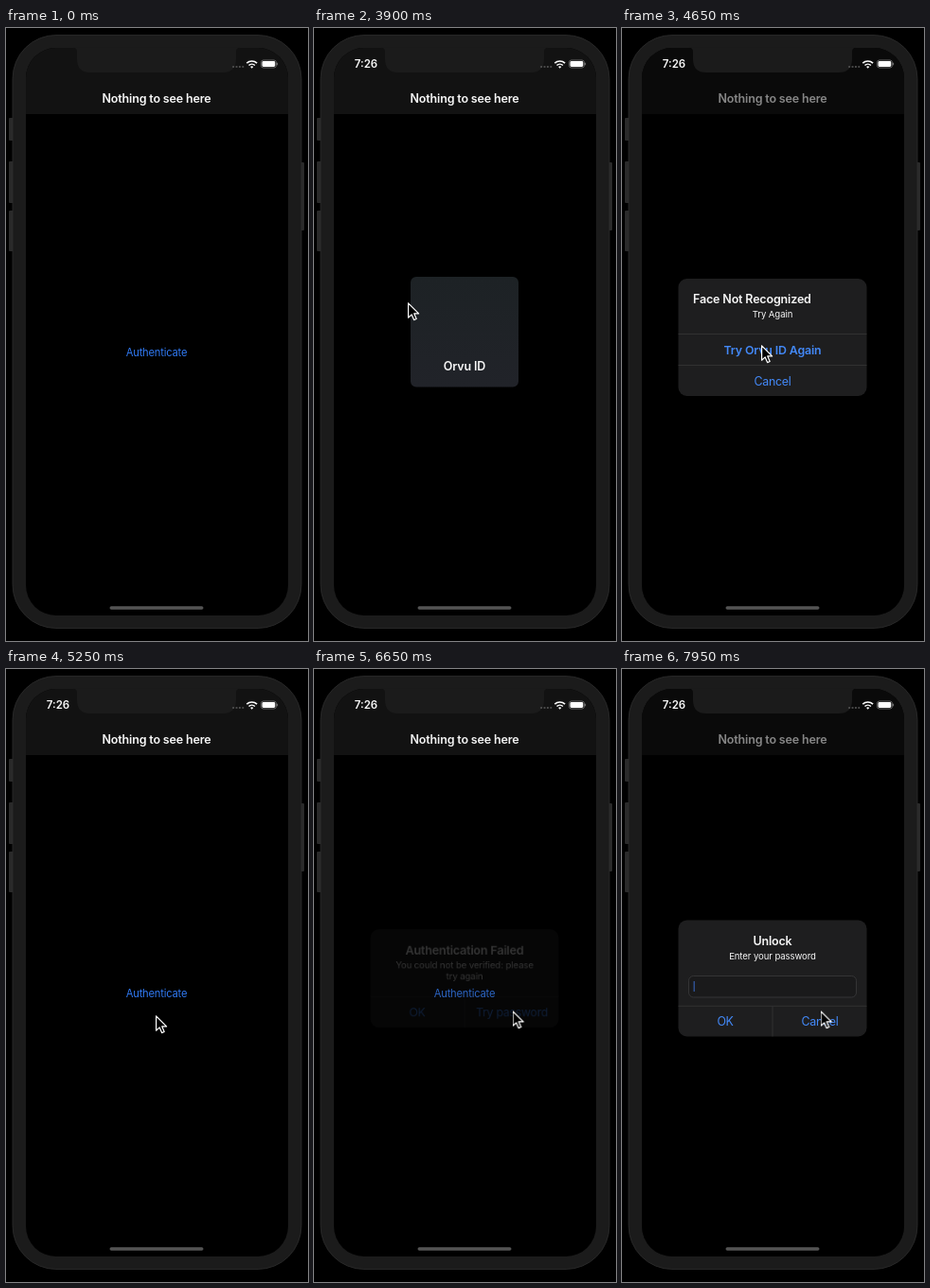
Write an HTML page that moves like this. It is 319 by 648 pixels and loops after 8000 ms.

```html
<!DOCTYPE html>
<html lang="en">
<head>
<meta charset="utf-8">
<title>Unlock flow</title>
<style>
  html, body { margin: 0; width: 100%; height: 100%; overflow: hidden; background: #000; }
  svg { display: block; width: 100%; height: 100%; }
  text { font-family: Inter, Roboto, sans-serif; text-anchor: middle; fill: #f7f7f7; }
  .head { font-size: 12.5px; font-weight: 600; letter-spacing: -.013em; }
  .note { font-size: 9.6px; letter-spacing: -.01em; }
  .action { font-size: 12.4px; letter-spacing: -.025em; fill: #4389f8; }
  .strong { font-weight: 600; letter-spacing: -.013em; }
  .link { font-size: 11.2px; letter-spacing: -.018em; fill: #3079f2; }
  .clock { font-size: 11.5px; font-weight: 600; }
  .card { fill: #1e1e1f; }
  .rule { stroke: #363637; stroke-width: .8; fill: none; }
  .press { fill: #fff; fill-opacity: .1; }
  .alert { transform-origin: 159px 327px; }
</style>
</head>
<body>
<svg viewBox="0 0 319 648">
  <defs>
    <clipPath id="screen"><rect x="21" y="21" width="277" height="600" rx="32"/></clipPath>
    <linearGradient id="glass" x2="0" y2="1">
      <stop stop-color="#1d2225"/><stop offset="1" stop-color="#212329"/>
    </linearGradient>
  </defs>
  <rect width="319" height="648"/>

  <!-- phone body -->
  <g fill="#2a2a2a">
    <rect x="3" y="95" width="5" height="24" rx="1"/>
    <rect x="3" y="141" width="5" height="44" rx="1"/>
    <rect x="3" y="193" width="5" height="43" rx="1"/>
    <rect x="311" y="142" width="4" height="72" rx="1"/>
  </g>
  <rect x="7" y="7.5" width="305" height="627" rx="46" fill="#1b1b1b" stroke="#2e2e2e" stroke-width=".8"/>

  <g clip-path="url(#screen)">
    <rect x="21" y="21" width="277" height="600"/>
    <rect x="21" y="21" width="277" height="70" fill="#121212"/>
    <text class="head" x="159" y="78.6">Nothing to see here</text>
    <text id="login" class="link" x="159" y="347">Authenticate</text>
    <rect id="dim" x="21" y="21" width="277" height="600"/>

    <g id="scan">
      <rect x="102" y="263" width="114" height="116.5" rx="6" fill="url(#glass)"/>
      <text class="head" x="159" y="361.6">Orvu ID</text>
    </g>

    <g id="retry" class="alert">
      <rect class="card" x="59.5" y="265" width="199" height="124" rx="9"/>
      <rect id="pressCancel" class="press" x="59.5" y="357" width="199" height="32" rx="6"/>
      <path class="rule" d="M59.5 323.5h199M59.5 356.5h199"/>
      <text class="head" x="75" y="291.4" style="text-anchor:start">Face Not Recognized</text>
      <text class="note" x="159" y="306">Try Again</text>
      <text class="action strong" x="159" y="345">Try Orvu ID Again</text>
      <text class="action" x="159" y="377.6">Cancel</text>
    </g>

    <g id="failed" class="alert">
      <rect class="card" x="59.5" y="275" width="199" height="104" rx="9"/>
      <rect id="pressPassword" class="press" x="159" y="346.5" width="99.5" height="32.5" rx="6"/>
      <path class="rule" d="M59.5 346.2h199M159 346.2V379"/>
      <text class="head" x="159" y="302">Authentication Failed</text>
      <text class="note" x="159" y="316.7">You could not be verified: please</text>
      <text class="note" x="159" y="328.5">try again</text>
      <text class="action" x="109" y="367.2">OK</text>
      <text class="action" x="209" y="367.2">Try password</text>
    </g>

    <g id="unlock" class="alert">
      <rect class="card" x="59.5" y="265.5" width="199" height="123" rx="9"/>
      <rect x="70.5" y="324.5" width="177" height="22.5" rx="5" fill="#1a1a1b" stroke="#3c3c3d" stroke-width=".8"/>
      <rect id="caret" x="75.5" y="330" width="1.5" height="11" fill="#3f7df0"/>
      <path class="rule" d="M59.5 356.3h199M159 356.3V388.5"/>
      <text class="head" x="159" y="292">Unlock</text>
      <text class="note" x="159" y="306.7">Enter your password</text>
      <text class="action" x="109" y="377.4">OK</text>
      <text class="action" x="209" y="377.4">Cancel</text>
    </g>
  </g>

  <!-- notch, status bar, home bar -->
  <path fill="#1b1b1b" d="M71 20.5q4 .5 4 4.5v8q0 14 14 14h140q14 0 14-14v-8q0-4 4-4.5z"/>
  <text id="clockBefore" class="clock" x="55" y="42">7:25</text>
  <text id="clockAfter" class="clock" x="55" y="42">7:26</text>
  <path d="M239.2 41h12" stroke="#5c5c5c" stroke-width="1.7" stroke-dasharray="1.9 1.5"/>
  <g fill="none" stroke="#fff" stroke-width="1.6">
    <path d="M254.3 37.2a7.8 7.8 0 0 1 10.8 0"/>
    <path d="M256.5 39.5a4.6 4.6 0 0 1 6.4 0"/>
  </g>
  <path fill="#fff" d="M258.1 41l1.6 1.7 1.6-1.7a2.3 2.3 0 0 0-3.2 0z"/>
  <rect x="269.4" y="34" width="16" height="8" rx="2.4" fill="none" stroke="#777" stroke-width=".8"/>
  <rect x="270.5" y="35.1" width="13.8" height="5.8" rx="1.4" fill="#fff"/>
  <path d="M286.6 36.7v2.6" stroke="#777"/>
  <rect x="109.5" y="611.2" width="99" height="3.6" rx="1.8" fill="#545454"/>

  <g id="cursor">
    <path d="M.6.8V16.2L4.2 12.9 6.6 18.6 9.2 17.5 6.8 11.9H11.6z" fill="#000" stroke="#fff" stroke-width="1.2" stroke-linejoin="round"/>
  </g>
</svg>
<script>
const LOOP = 8000;
const SOFT = 'cubic-bezier(.25, .5, .5, 1)';

const key = (time, prop, value, easing = 'linear') => ({ offset: time / LOOP, [prop]: value, easing });
const play = (id, frames) =>
  document.getElementById(id).animate(frames, { duration: LOOP, iterations: Infinity });

// Opacity goes from base to peak during each [start, stop] span; without stop it stays.
function pulse(id, spans, { base = 0, peak = 1, rise = 0, fall = 0 } = {}) {
  const frames = [key(0, 'opacity', base)];
  for (const [start, stop] of spans) {
    frames.push(key(start, 'opacity', base, SOFT), key(start + rise, 'opacity', peak));
    if (stop) frames.push(key(stop, 'opacity', peak, SOFT), key(stop + fall, 'opacity', base));
  }
  const stays = !spans[spans.length - 1][1];
  play(id, [...frames, key(LOOP, 'opacity', stays ? peak : base)]);
}

function shrinkIn(id, start) {
  play(id, [
    key(0, 'transform', 'scale(1.1)'),
    key(start, 'transform', 'scale(1.1)', 'ease-in-out'),
    key(start + 450, 'transform', 'scale(1)'),
    key(LOOP, 'transform', 'scale(1)')
  ]);
}

// Each move is [start, duration, x, y].
function travel(id, [x, y], moves) {
  const at = () => `translate(${x}px, ${y}px)`;
  const frames = [key(0, 'transform', at())];
  for (const [start, duration, nextX, nextY] of moves) {
    frames.push(key(start, 'transform', at(), 'ease-in-out'));
    [x, y] = [nextX, nextY];
    frames.push(key(start + duration, 'transform', at()));
  }
  play(id, [...frames, key(LOOP, 'transform', at())]);
}

const retry = [4200, 4950], failed = [5500, 6500], unlock = [7050];

pulse('clockBefore', [[0, 300]]);
pulse('clockAfter', [[300]]);
pulse('login', [[350, 400]], { base: 1, peak: .3, fall: 100 });
pulse('scan', [[650, 4100]], { rise: 250, fall: 300 });
pulse('retry', [retry], { rise: 250, fall: 300 });
pulse('failed', [failed], { rise: 400, fall: 300 });
pulse('unlock', [unlock], { rise: 400 });
pulse('dim', [retry, failed, unlock], { peak: .46, rise: 300, fall: 200 });
shrinkIn('failed', failed[0]);
shrinkIn('unlock', unlock[0]);

pulse('pressCancel', [[4900, 4950]], { fall: 100 });
pulse('pressPassword', [[6350, 6500]], { fall: 100 });
pulse('caret', [[7600, 7930]], { base: 1, peak: 0, rise: 150, fall: 70 });

pulse('cursor', [[50, 900], [3900]]);
travel('cursor', [61, 500], [
  [50, 350, 148, 341],
  [700, 200, 99, 290],
  [4300, 350, 147, 335],
  [4650, 200, 158, 366],
  [5650, 150, 166, 364],
  [5800, 250, 104, 380],
  [6150, 250, 209.5, 361]
]);
</script>
</body>
</html>
```
